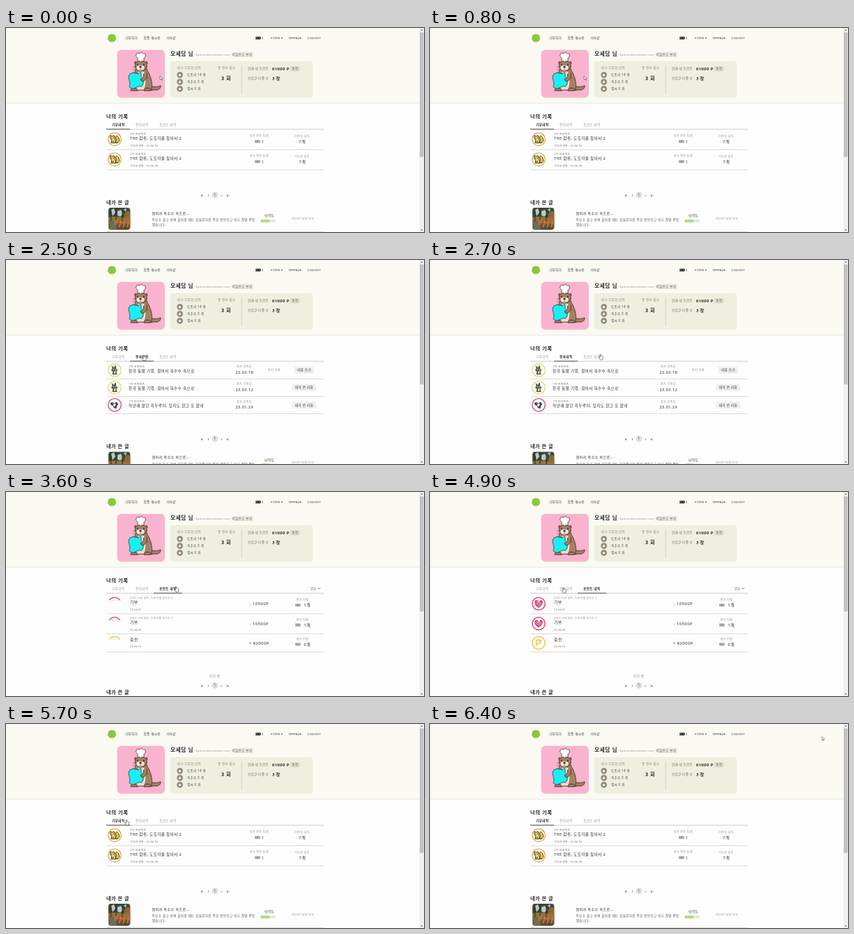
Animation, 600 px wide and 294 px high, one loop 6.5 s. Source, as an HTML page:

```html
<!DOCTYPE html>
<html lang="ko">
<head>
<meta charset="utf-8">
<title>나의 기록</title>
<style>
html, body { margin: 0; width: 100%; height: 100%; overflow: hidden; background: #fefdfd; }
svg { display: block; width: 600px; height: 294px; }
text { font-family: 'Noto Sans', 'Noto Sans CJK KR', 'Noto Sans CJK', sans-serif; letter-spacing: .07em; white-space: pre; }
.page, .arrow, .hand, .cover { animation: 6.5s step-end infinite; }
.page0 { animation-name: donate; }
.page1 { animation-name: serve; }
.page2 { animation-name: points; }
.cover { animation-name: load; }
.arrow { animation-name: arrow; }
.hand { animation-name: hand; }
.cursor { animation: move 6.5s linear infinite; }
@keyframes donate { 0%, 84.6% { visibility: visible } 38.45% { visibility: hidden } 100% { visibility: visible } }
@keyframes serve { 0%, 53.83%, 84.6% { visibility: hidden } 38.45%, 76.9% { visibility: visible } 100% { visibility: hidden } }
@keyframes points { 0%, 76.9% { visibility: hidden } 53.83% { visibility: visible } 100% { visibility: hidden } }
@keyframes load { 0%, 56.9% { visibility: hidden } 53.83% { visibility: visible } 100% { visibility: hidden } }
@keyframes arrow { 0%, 88% { visibility: visible } 30% { visibility: hidden } 100% { visibility: visible } }
@keyframes hand { 0%, 88% { visibility: hidden } 30% { visibility: visible } 100% { visibility: hidden } }
@keyframes move {
  0%, 15.38% { transform: translate(221px, 69px) }
  24.6%, 26.16% { transform: translate(220.5px, 122px) }
  32.3%, 38.45% { transform: translate(196px, 137px) }
  41.5% { transform: translate(243.5px, 135.5px) }
  46%, 61.5% { transform: translate(243px, 136px) }
  70.8%, 81.5% { transform: translate(190.5px, 137.5px) }
  83.8%, 87.7% { transform: translate(171.5px, 138px) }
  92.3% { transform: translate(400px, 68px) }
  98.4%, 100% { transform: translate(562.5px, 18px) }
}
</style>
</head>
<body>
<svg viewBox="0 0 600 294" xmlns="http://www.w3.org/2000/svg">
  <defs>
    <g id="ticket">
      <rect x="-3.7" y="-2.1" width="7.4" height="4.2" rx=".6" fill="currentColor"/>
      <path d="M-1.8-2.1v4.2M1.8-2.1v4.2" stroke="#fff" stroke-width=".5" stroke-dasharray=".7 .5"/>
    </g>
    <g id="squirrel">
      <circle r="9.3" fill="#fff" stroke="#cfa02b" stroke-width="1.2"/>
      <g stroke="#2b210d" stroke-width=".9" stroke-linejoin="round">
        <path d="M1 5C9 6 7-1 4.5-4 2.5-6 0-4 2-1 3 1 2 3 1 3Z" fill="#efc83c"/>
        <path d="M-6.5-2-6-5.5-3.8-4-1-5.5-.2-2 1 1 1.8 5.2-4.5 5.2-4.4 1.4Z" fill="#f3d669"/>
        <path d="M-5.5 5.2H4.5M-3.5 3H-1" fill="none"/>
      </g>
      <circle cx="-4.6" cy="-1.7" r=".6"/><circle cx="-2" cy="-1.7" r=".6"/>
    </g>
    <g id="rabbit">
      <circle r="9.3" fill="#fff" stroke="#d9dc58" stroke-width="1.2"/>
      <path d="M-4-6-1-3 1-7 2-2 4 0 2 2 3 6-3 6-2 2-5 0-3-2Z" fill="#555d4a" stroke="#222" stroke-width=".6"/>
      <path d="M-1 2 2 1 1 5-1 5Z" fill="#e5e78c"/>
      <circle cx="-1.5" cy="-1" r=".7" fill="#fff"/><circle cx="1.3" cy="-1" r=".7" fill="#fff"/>
    </g>
    <g id="crane">
      <circle r="9.3" fill="#fff" stroke="#dc4e78" stroke-width="1.4"/>
      <path d="M-6-3-3-4-1-2 3-4 5-1 3 1 2 5-1 4-2 1-5 0Z" fill="#444" stroke="#222" stroke-width=".5"/>
      <path d="M-2-1 1-2 1 1-1 2ZM-4-3-3-2" fill="#fff" stroke="#fff" stroke-width=".6"/>
    </g>
    <g id="heart">
      <circle r="9.1" fill="#fff" stroke="#d9487a" stroke-width="1.5"/>
      <path d="M0 6C-9 0-6-6-2.7-5.3Q-.8-5 0-3 .8-5 2.7-5.3C6-6 9 0 0 6Z" fill="#d9487a"/>
      <path d="M-4.8-2 1.5 3.5M-3-3.5 3 2M-1-4 4.5.5M2-4.7-.5-1.5" fill="none" stroke="#fff" stroke-width=".7"/>
    </g>
    <g id="coin">
      <circle r="9.1" fill="#fff" stroke="#efc540" stroke-width="1.5"/>
      <path d="M-3 5.2V-4H0A2.8 2.8 0 0 1 0 1.6H-3M3.2-4.6v3.4M1.7-2.9h3.2" transform="translate(-.5 -.3)" fill="none" stroke="#efc540" stroke-width="1.5"/>
    </g>
    <clipPath id="frame"><rect x="147" y="259" width="31.3" height="31.5" rx="4"/></clipPath>
    <linearGradient id="grass" x1="0" y1="0" x2="0" y2="1">
      <stop stop-color="#8f7a3c"/><stop offset=".45" stop-color="#a8683a"/><stop offset="1" stop-color="#4a4528"/>
    </linearGradient>
    <g id="photo" clip-path="url(#frame)">
      <rect x="147" y="259" width="32" height="32" fill="#3e4a35"/>
      <path d="M151 262 155 260 157 266 153 271ZM160 264 165 262 168 268 164 272 160 270ZM169 261 173 260 172 265Z" fill="#bcc8ce"/>
      <path d="M171 266Q176 262 179 266V279H168Z" fill="#8e6a34"/>
      <path d="M147 273Q158 270 179 275V291H147Z" fill="url(#grass)"/>
      <path d="M147 278 154 276 160 291H147Z" fill="#6d6b52"/>
      <path d="M150 259 151 278M158 259V277M167 262V278" stroke="#2a3024" stroke-width="1.1"/>
      <path d="M156 284 159 277M162 287 165 278M168 288 170 279M174 287 176 278" stroke="#cf8c4c" stroke-width="1"/>
      <path d="M159 289 162 281M166 290 167 283M171 290 173 282" stroke="#4d3d24" stroke-width="1"/>
    </g>
  </defs>
  <g id="stage"></g>
  <g class="cursor">
    <path class="arrow" d="M0 0V5.4L1.3 4.3 2.2 6.3 3 5.9 2.2 4H3.9Z" fill="#fff" stroke="#333" stroke-width=".5"/>
    <path class="hand" d="M.4.6Q1.1-.3 1.7.6V2.6Q2.4 2.2 2.8 2.9 3.5 2.6 3.8 3.3 4.7 3.1 4.8 4V6L4 8H.8L-1.2 5.2Q-1.5 4 .4 5Z" fill="#fff" stroke="#222" stroke-width=".6"/>
  </g>
</svg>
<script>
const GREY = '#929292', DARK = '#2b2b2b';

// Text placed by the middle of its line; smaller glyphs make room for the tracking.
const text = (x, cy, size, str, fill = DARK, weight = 400, anchor = 'start') =>
  `<text x="${x}" y="${cy + size * .34}" font-size="${size * .93}" fill="${fill}" font-weight="${weight}" text-anchor="${anchor}">${str}</text>`;
const mid = (x, cy, size, str, fill, weight) => text(x, cy, size, str, fill, weight, 'middle');
const rect = (x, y, w, h, fill, r = 0) =>
  `<rect x="${x}" y="${y}" width="${w}" height="${h}" rx="${r}" fill="${fill}"/>`;
const line = (y, color = '#ccc') => rect(144, y - .35, 312, .7, color);
const use = (id, x, y, color = '#9a9a9a') => `<use href="#${id}" x="${x}" y="${y}" color="${color}"/>`;

function otter() {
  return `<g stroke="#2b2220" stroke-width=".7" stroke-linejoin="round">
    <path d="M203 80Q212 88 222 83 223 87 217 89.5H203Z" fill="#a57f62"/>
    <path d="M187 58Q179 74 181 89.5H209Q212 74 201 58Z" fill="#a57f62"/>
    <path d="M190 63Q185 76 188 89H198Q203 76 198 63Z" fill="#e9dccb" stroke="none"/>
    <path d="M179 90Q179 86.5 184 86.5 189 87 189 90.5H180ZM198 90.5Q198 86.5 203 86.5 208.5 87 208 90.5Z" fill="#a57f62"/>
    <circle cx="186" cy="50" r="1.6" fill="#a57f62"/><circle cx="201.5" cy="50" r="1.6" fill="#a57f62"/>
    <ellipse cx="193.7" cy="54.3" rx="8.6" ry="7.3" fill="#a57f62"/>
    <ellipse cx="193" cy="57.5" rx="5.8" ry="3.8" fill="#f2e9dd" stroke="none"/>
    <path d="M177 67Q181 63 185 65T194 64Q193 70 196 74T195 84Q190 83 186 86T177 85Q179 80 177 76T177 67Z" fill="#19f0f4"/>
    <path d="M202 65Q204 76 195 77L193 74Q198 73 197.5 66" fill="#a57f62"/>
    <path d="M189 47.5V43Q185 41 187 37.5 189 35 192 36.5 194 33.5 197 36.5 200.5 36 200.5 39.5 200.5 42 198 43V47.5Q193.5 49 189 47.5Z" fill="#fff"/>
    <path d="M193 57V58.8M190.8 59.6Q192.2 60.4 193 58.8 194.4 60.4 195.8 59.6M187 57 182 56M187 59 182 60M199 57 204 56M199 59 204 60" fill="none" stroke-width=".4"/>
    <ellipse cx="193" cy="56" rx="1.5" ry="1" fill="#2b2220"/>
    <circle cx="188.7" cy="53" r=".6" fill="#2b2220"/><circle cx="197.7" cy="53" r=".6" fill="#2b2220"/>
  </g>`;
}

function header() {
  const feeds = ['도토리 14 개', '옥수수 0 개', '볍씨 0 개'].map((label, i) => {
    const y = 67.6 + i * 10;
    return `<circle cx="249.6" cy="${y}" r="4.3" fill="#8f8678"/>
      <path d="M247.4 ${y + 1}q1-3 2.3-2.5t2 1.5q-1 2.4-2.7 2Z" fill="#f4f1e8"/>`
      + text(260, y, 4.9, label, '#444');
  }).join('');
  return rect(0, 0, 600, 108, '#fafaf3') + rect(0, 107.8, 600, .8, '#e2e3d9')
    + '<circle cx="152" cy="14.5" r="6" fill="#8cc63f"/>'
    + text(171, 14.5, 4.9, '기부하기') + text(197.5, 14.5, 4.9, '인증 게시판') + text(230, 14.5, 4.9, '기타샵')
    + use('ticket', 362, 14.5, '#333') + text(367, 14.3, 4.6, '3') + text(380, 14.3, 4.6, '61000 P')
    + text(406, 14.3, 4.6, 'MYPAGE') + text(433, 14.3, 4.6, 'LOGOUT')
    + rect(159.5, 31.6, 68.5, 68.8, '#f9b3ce', 6) + otter()
    + text(236, 37.5, 8.3, '오세담 님', DARK, 600) + text(272, 38.3, 4.5, 'damsei@example.com', GREY)
    + rect(322.5, 34.5, 33, 7.6, '#edede3', 2) + mid(339, 38.3, 4.9, '비밀번호 변경', '#666')
    + rect(236, 47.7, 204.5, 52.9, '#efefe0', 4)
    + text(245.5, 57, 4.9, '내가 기부한 모이', '#808080') + feeds
    + text(304, 57, 4.9, '총 봉사 횟수', '#808080') + text(309, 72.5, 7.8, '3 회', DARK, 600)
    + rect(337.8, 54, .7, 40.5, '#c4c4b8')
    + text(347, 58.7, 4.9, '현재 내 포인트', '#666') + text(382, 58.5, 6.3, '61000 P', DARK, 600)
    + rect(408, 55, 14, 7.8, '#dedecf', 2) + mid(415, 58.8, 4.9, '충전', '#666')
    + text(347, 72.7, 4.9, '보유한 티켓 수', '#666') + text(382, 72.5, 6.5, '3 장', DARK, 600)
    + text(144, 127, 7.9, '나의 기록', '#222', 700);
}

function tabs(active) {
  const items = [['기부내역', 152, 144, 34], ['봉사내역', 186, 178, 34], ['포인트 내역', 220, 212, 41]];
  return line(146, '#b5b5b5') + items.map(([label, x, left, w], i) =>
    text(x, 139, 4.95, label, i === active ? '#222' : '#9c9c9c', i === active ? 700 : 400)
    + (i === active ? rect(left, 145.3, w, 1, '#555') : '')).join('');
}

const donations = () => [0, 29].map(d =>
  use('squirrel', 156, 160.3 + d)
  + text(178, 152.4 + d, 4.25, '2차 프로젝트', '#777')
  + text(178, 159.3 + d, 6, 'THE 람쥐, 도토리를 찾아서 2')
  + text(178, 169.6 + d, 4.05, '기부한 날짜 : 23.04.06', '#777')
  + text(349.5, 155.5 + d, 4.5, '내가 받은 티켓', GREY)
  + use('ticket', 361, 163.5 + d) + text(366.5, 163.8 + d, 6.4, '1', DARK, 500)
  + mid(425, 156 + d, 4.5, '기부한 모이', GREY) + mid(425.3, 164 + d, 6.6, '7개', DARK, 500)
  + line(175.4 + d)).join('');

function services() {
  const walk = '한국 동물 기행, 걸어서 옥수수 속으로';
  const rows = [
    ['rabbit', walk, '23.03.18', '리뷰 쓰기', 28],
    ['rabbit', walk, '23.03.12', '내가 쓴 리뷰', 34],
    ['crane', '작년에 왔던 흑두루미, 잊지도 않고 또 왔네', '23.01.29', '내가 쓴 리뷰', 34]];
  return rows.map(([icon, title, date, label, w], i) => {
    const d = i * 25.1;
    return use(icon, 156, 158.7 + d)
      + text(176, 153.2 + d, 4.25, '1차 프로젝트', '#777') + text(176, 160 + d, 6.07, title)
      + mid(342, 153.8 + d, 4.5, '봉사 신청일', GREY) + mid(342.3, 161.6 + d, 6.1, date, DARK, 500)
      + rect(428 - w / 2, 154 + d, w, 9.5, '#eee', 2) + mid(428, 158.6 + d, 5.05, label)
      + line(171.5 + d);
  }).join('') + text(376, 158.3, 4.5, '봉사 완료', GREY);
}

function points() {
  const project = '[2차] THE 람쥐, 도토리를 찾아서 2';
  const rows = [
    ['heart', 161, '기부', '- 10500P', '1개', '23.04.06', project, 175.3],
    ['heart', 189.6, '기부', '- 10500P', '1개', '23.04.06', project, 204.3],
    ['coin', 217.5, '충전', '+ 82000P', '0개', '23.04.03', '', 230.5]];
  return text(437, 139, 4.7, '모두', '#444')
    + '<path d="M448 138l1.7 1.8 1.7-1.8" fill="none" stroke="#555" stroke-width=".8"/>'
    + rows.map(([icon, y, kind, sum, got, date, note, end]) =>
      use(icon, 156, y) + `<rect class="cover" x="145" y="${y - 4.8}" width="22" height="15.5" fill="#fefdfd"/>`
      + text(178, y - 8.3, 4.15, note, GREY)
      + text(178, y - (note ? 1.7 : 4.6), 6.2, kind) + text(178, y + (note ? 8.7 : 5.3), 3.8, date, '#777')
      + mid(363.3, y + .1, 6.4, sum, DARK, 500)
      + mid(425.5, y - 5.2, 4.4, '받은 티켓', GREY) + use('ticket', 419, y + 2)
      + text(427.5, y + 1.8, 6.5, got, DARK, 500) + line(end)).join('')
    + mid(299.7, 265.3, 5.2, '로딩 중', GREY);
}

// Pager, article and scroll thumb sit lower or shorten as the list grows.
function foot(pagerShift, postShift) {
  const y = 241 + pagerShift;
  const marks = ['«', '‹', '', '›', '»'].map((m, i) => mid(281.3 + i * 9.3, y - .2, 5.2, m, '#444', 600)).join('');
  let bars = '';
  for (let i = 0; i < 10; i++) bars += rect(366 + i * 2.15, 276, 1.4, 4.2, i < 6 ? '#86c84b' : '#cfe6b8');
  return `<circle cx="300" cy="${y - .2}" r="4.6" fill="#dedede"/>` + mid(300, y - .2, 4.9, '1', '#333') + marks
    + `<g transform="translate(0 ${postShift})">`
    + text(144, 251, 7.7, '내가 쓴 글', '#222', 700) + '<use href="#photo"/>'
    + text(209.5, 267.3, 5.5, '걸어서 옥수수 속으로...', DARK, 500)
    + text(209.5, 276.8, 4.98, '옥수수 들고 산에 올라갈 때는 힘들었지만 막상 완등하고 보니 정말 뿌듯', '#555')
    + text(209.5, 283.8, 4.98, '했습니다.', '#555')
    + mid(378.3, 270.7, 5.1, '난이도', DARK, 500) + bars
    + text(409.5, 274.5, 4, '2023년 04월 05일', GREY) + line(293.4) + '</g>'
    + rect(594, 6.5, 5.4, 281 * 294 / (461 + postShift), '#c1c1c1');
}

const pages = [donations() + foot(0, 0), services() + foot(17, 17.3), points() + foot(38, 37.5)];
document.getElementById('stage').innerHTML =
  rect(0, 0, 600, 294, '#fefdfd') + header() + rect(593.3, 0, 6.7, 294, '#f1f1f1')
  + '<path d="M596.7 2.2l1.6 1.9h-3.2ZM596.7 292.2l1.6-1.9h-3.2Z" fill="#666"/>'
  + pages.map((body, i) => `<g class="page page${i}">${tabs(i)}${body}</g>`).join('');
</script>
</body>
</html>
```
